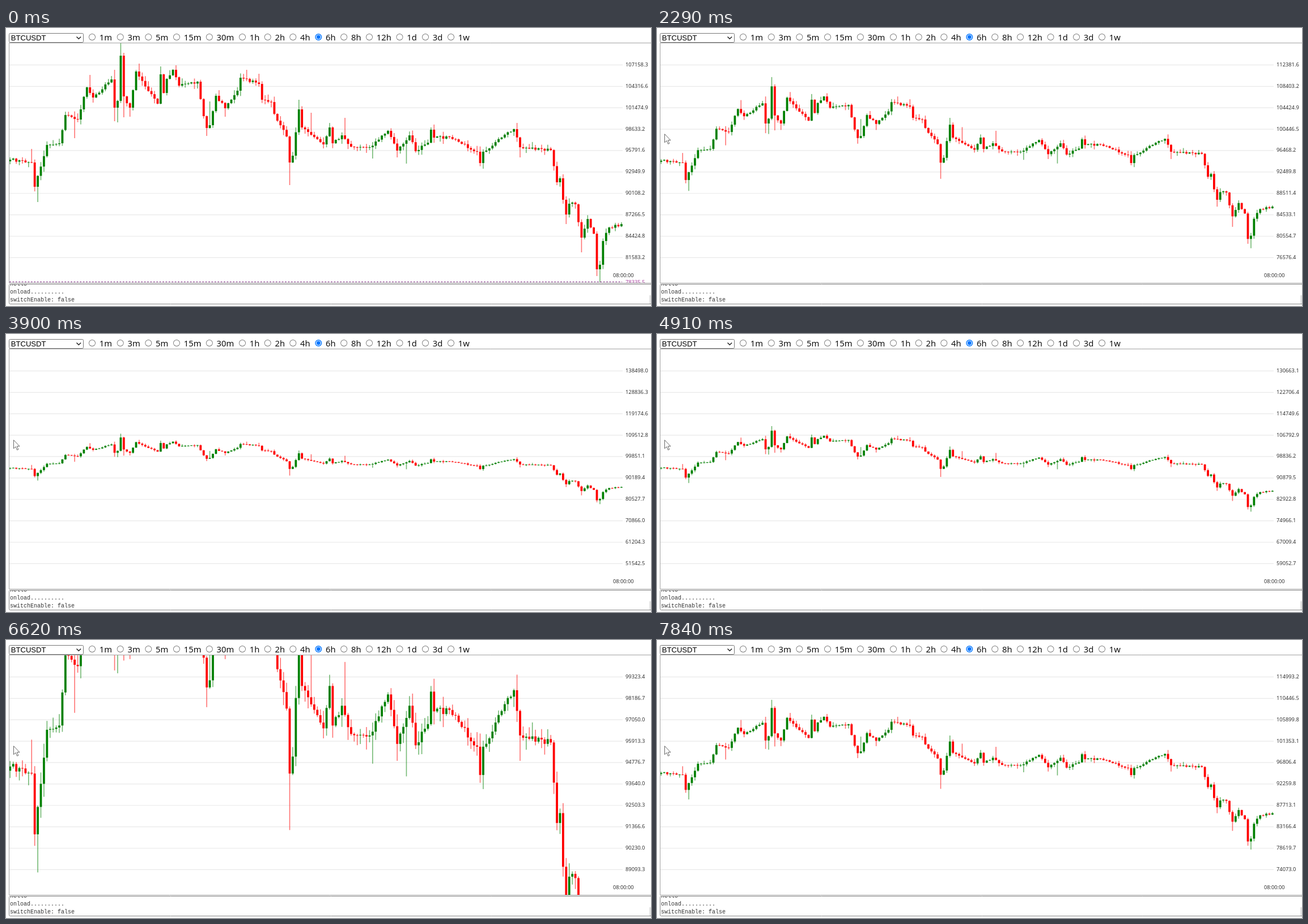
Animation of 1138x492 px, one loop 8000 ms. Source, as an HTML page with a canvas:

```html
<!DOCTYPE html>
<html lang="en">
<head>
<meta charset="utf-8">
<title>Candlestick chart</title>
<style>
  html, body { margin: 0; width: 100%; height: 100%; overflow: hidden; background: #fff; }
  canvas { display: block; }
</style>
</head>
<body>
<canvas id="stage" width="1138" height="492"></canvas>
<script>
const ctx = document.getElementById('stage').getContext('2d');
const LOOP = 8000;
const SANS = '"Noto Sans", "Open Sans", sans-serif';

// Price axis: ten grid rows; zooming stretches prices about the middle.
const MID_Y = 239.1, MID_PRICE = 94100.07, TOP_OFFSET = 13058.21;
const ROW_PRICE = 2841.681, ROW_GAP = 37.89, TOP_ROW = 65;
const PRICE_PER_PX = ROW_PRICE / ROW_GAP;

// Candle closes at turning points as index, height at zoom 1.
const TURNS = [
  0,233, 7,238, 8,281, 12,207, 16,204, 18,154, 22,162, 25,105, 27,123, 33,91,
  34,141, 35,129, 36,49, 37,121, 39,141, 41,77, 48,134, 49,82, 50,115, 51,90,
  53,74, 55,102, 61,95, 63,156, 64,177, 65,172, 67,120, 70,142, 74,111, 75,88,
  81,99, 82,127, 85,131, 86,152, 90,192, 91,238, 92,226, 94,144, 95,176, 98,189,
  102,206, 104,176, 105,204, 108,190, 111,210, 117,211, 123,182, 126,217, 130,190,
  132,218, 136,203, 137,180, 138,194, 143,193, 152,219, 153,239, 154,219, 164,179,
  166,211, 176,216, 178,273, 179,266, 180,304, 181,330, 182,311, 184,312, 186,371,
  188,338, 190,364, 191,427, 192,419, 193,377, 195,353, 199,347
];
// Outstanding wick tips by candle index.
const HIGHS = { 7: 214, 26: 83, 34: 74, 36: 26, 37: 44, 42: 63, 49: 68, 54: 66, 65: 130,
  77: 74, 81: 81, 94: 127, 98: 150, 109: 159, 137: 176, 165: 168 };
const LOWS = { 9: 308, 21: 195, 34: 165, 35: 167, 37: 158, 39: 157, 64: 191, 70: 157, 91: 278,
  118: 231, 126: 229, 129: 240, 154: 249, 166: 229, 181: 347, 186: 397, 191: 439, 192: 450 };

let seed = 7;
function random() {
  seed = (seed * 16807) % 2147483647;
  return seed / 2147483647;
}

function buildCandles() {
  const closes = [];
  for (let n = 0; n < TURNS.length; n += 2) {
    const [from, y0, to = from + 1, y1 = y0] = TURNS.slice(n, n + 4);
    for (let i = from; i < to; i++) {
      const wiggle = i > from ? (random() - 0.5) * 5 : 0;
      closes.push(y0 + (y1 - y0) * (i - from) / (to - from) + wiggle);
    }
  }
  return closes.map((close, i) => {
    const open = i ? closes[i - 1] : 236;
    const top = Math.min(open, close), bottom = Math.max(open, close);
    return {
      x: 7.3 + 5.42 * i, top, bottom,
      high: HIGHS[i] ?? top - 1 - 9 * random() ** 2,
      low: LOWS[i] ?? bottom + 1 + 9 * random() ** 2,
      color: close < open ? '#008000' : '#ff0000'
    };
  });
}
const candles = buildCandles();

// Wheel notches, each changing the zoom by 0.2.
const WIDER = [2020, 2290, 2490, 2690, 2890, 3020, 3150, 3350, 3480, 3630, 3700, 3900, 4025,
  4150, 7040, 7240, 7370, 7570, 7710, 7840];
const TIGHTER = [4370, 4500, 4640, 4770, 4910, 5040, 5170, 5300, 5430, 5560, 5690, 5830, 5960,
  6160, 6290, 6420, 6620];
const passed = (times, t) => times.filter(time => time <= t).length;
const zoomAt = t => 1 + 0.2 * (passed(WIDER, t) - passed(TIGHTER, t));

const POINTER = [[-6, 471], [-2, 440], [2, 400], [6, 355], [9, 312], [10, 276], [9, 246], [7, 226],
  [5, 218], [3, 238], [3, 266], [5, 250], [8, 226], [11, 203], [13, 187.677]];
function pointerAt(t) {
  if (t < 230) return null;
  const step = t < 1090 ? Math.min(10, Math.floor((t - 230) / 79)) : 11 + Math.floor((t - 1090) / 70);
  return POINTER[Math.min(step, POINTER.length - 1)];
}

function text(str, x, y, size, color = '#333', family = SANS) {
  ctx.font = `${size}px ${family}`;
  ctx.fillStyle = color;
  ctx.fillText(str, x, y);
}

function line(points, color, width = 1) {
  ctx.strokeStyle = color;
  ctx.lineWidth = width;
  ctx.beginPath();
  points.forEach(([x, y]) => ctx.lineTo(x, y));
  ctx.stroke();
}

function box(x, y, w, h, r, color) {
  ctx.strokeStyle = color;
  ctx.lineWidth = 1;
  ctx.beginPath();
  ctx.roundRect(x, y, w, h, r);
  ctx.stroke();
}

function disc(x, y, r, color) {
  ctx.fillStyle = color;
  ctx.beginPath();
  ctx.arc(x, y, r, 0, 7);
  ctx.fill();
}

function clipped(x, y, w, h, paint) {
  ctx.save();
  ctx.beginPath();
  ctx.rect(x, y, w, h);
  ctx.clip();
  paint();
  ctx.restore();
}

const INTERVALS = { '1m': 152, '3m': 201.7, '5m': 251.3, '15m': 301, '30m': 358.8, '1h': 417,
  '2h': 461.7, '4h': 506.3, '6h': 551.3, '8h': 596.2, '12h': 641, '1d': 694.5, '3d': 740, '1w': 785 };

function drawToolbar() {
  box(5.5, 9.5, 131, 16, 2, '#767676');
  text('BTCUSDT', 8.7, 22, 13.1, '#000', '"Liberation Sans", Arial, sans-serif');
  line([[124.5, 15.5], [128.3, 19.3], [132.1, 15.5]], '#222', 1.5);
  for (const [label, x] of Object.entries(INTERVALS)) {
    const chosen = label === '6h', color = chosen ? '#0075ff' : '#767676';
    disc(x, 16, 6, color);
    disc(x, 16, chosen ? 4.6 : 5.1, '#fff');
    if (chosen) disc(x, 16, 3.4, color);
    text(label, x + 12.8, 21.7, 14.8, '#111');
  }
}

function drawCandles(zoom) {
  const place = y => MID_Y + (y - MID_Y) / zoom;
  for (const c of candles) {
    const high = place(c.high), low = place(c.low), top = place(c.top), bottom = place(c.bottom);
    ctx.fillStyle = c.color;
    ctx.globalAlpha = 0.55;
    ctx.fillRect(c.x - 0.8, high, 1.6, low - high);
    ctx.globalAlpha = 1;
    ctx.fillRect(c.x - 1.9, top, 3.8, Math.max(1, bottom - top));
  }
}

function drawCrosshair(y) {
  const price = MID_PRICE + (MID_Y - y) * PRICE_PER_PX;
  ctx.setLineDash([3, 2.4]);
  line([[6, y], [1087, y]], 'rgba(110, 20, 115, 0.8)', 1.2);
  ctx.setLineDash([]);
  text(price.toFixed(1), 1093, y + 3.4, 9.3, '#a8409f');
}

function drawChart(t, pointer) {
  const zoom = zoomAt(t);
  clipped(5, 27, 1133, 424, () => {
    for (let row = 0; row < 10; row++) {
      const y = TOP_ROW + row * ROW_GAP;
      const price = MID_PRICE + (TOP_OFFSET - row * ROW_PRICE) * zoom;
      line([[6, y + 0.4], [1088, y + 0.4]], '#e9e9e9', 1.2);
      text(price.toFixed(1), 1093, y + 2.9, 9.3);
    }
    drawCandles(zoom);
    text('08:00:00', 1071, 441.3, 9.2);
    if (t < 2020) drawCrosshair(pointer ? Math.min(pointer[1], 449.299) : 449.299);
  });
  line([[1138, 26.5], [5.5, 26.5], [5.5, 451.5], [1138, 451.5]], '#a2a2a2');
}

function drawLog() {
  clipped(6, 454, 1127, 35, () => {
    ['hello', 'onload..........', 'switchEnable: false'].forEach((entry, i) =>
      text(entry, 7, 456.2 + 14 * i, 10, '#333', '"Liberation Mono", monospace'));
  });
  ctx.fillStyle = '#e4e4e4';
  ctx.fillRect(1135, 473, 3, 15);
  box(5.5, 453.5, 1140, 35, 2, '#858585');
}

function drawPointer([x, y], pressed) {
  if (pressed) disc(x, y, 11, 'rgba(255, 255, 0, 0.47)');
  ctx.beginPath();
  [[0, 0], [0, 15], [3.5, 11.8], [6, 17.6], [8.3, 16.6], [5.8, 11], [10.5, 11]]
    .forEach(([dx, dy]) => ctx.lineTo(x + 0.5 + dx, y + dy));
  ctx.closePath();
  ctx.fillStyle = '#fff';
  ctx.fill();
  ctx.strokeStyle = '#555';
  ctx.lineWidth = 0.9;
  ctx.stroke();
}

function draw(now) {
  const t = now % LOOP, pointer = pointerAt(t);
  ctx.fillStyle = '#fff';
  ctx.fillRect(0, 0, 1138, 492);
  drawToolbar();
  drawChart(t, pointer);
  drawLog();
  if (pointer) drawPointer(pointer, t >= 1560 && t < 1690);
  requestAnimationFrame(draw);
}
requestAnimationFrame(draw);
</script>
</body>
</html>
```
